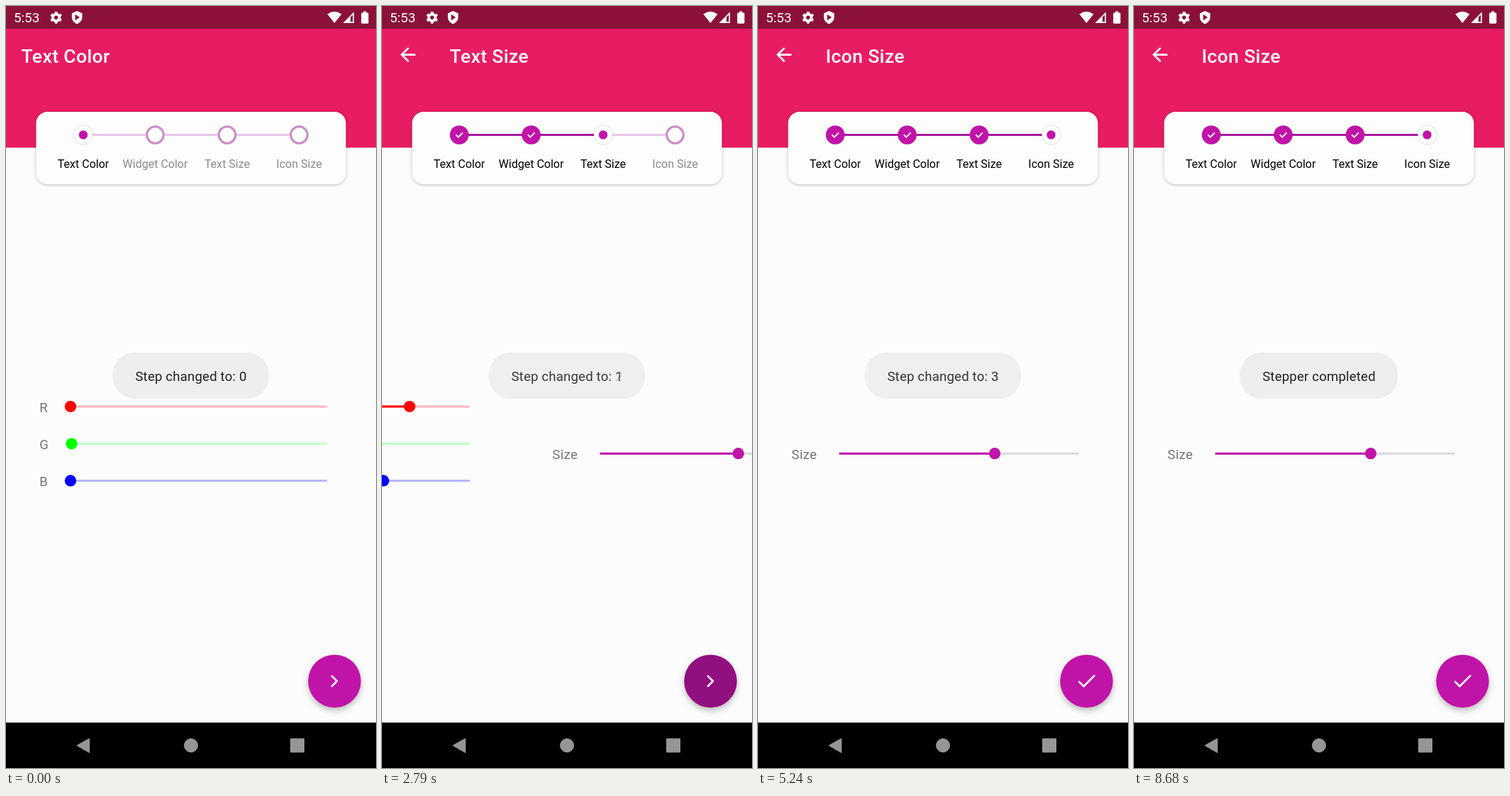
Write an HTML page that moves like this. It is 522 px wide and 1073 px high and loops after 8760 ms.

```html
<!DOCTYPE html>
<html lang="en">
<head>
<meta charset="utf-8">
<title>Stepper</title>
<style>
  html, body { margin: 0; width: 100%; height: 100%; overflow: hidden; background: #fcfcfc; }
  svg { display: block; width: 522px; height: 1073px; font-family: Roboto, "Noto Sans", sans-serif; }
  .title { font-size: 26.6px; font-weight: 500; letter-spacing: .0125em; fill: #fff; }
  .step { font-size: 16px; text-anchor: middle; }
  .label { font-size: 18.6px; letter-spacing: .0179em; fill: #757575; }
  .toast { font-size: 18.6px; letter-spacing: .01em; text-anchor: middle; fill: #202020; }
  .card { filter: drop-shadow(0 1.5px 2px rgba(0, 0, 0, .25)); }
  .current { filter: drop-shadow(0 .5px 1.3px rgba(0, 0, 0, .25)); }
  .stroke { fill: none; stroke: #fff; stroke-linecap: round; stroke-linejoin: round; }
</style>
</head>
<body>
<svg viewBox="0 0 522 1073">
  <defs><clipPath id="fabClip"><circle cx="463.5" cy="950.7" r="37.3"/></clipPath></defs>
  <rect width="522" height="1073" fill="#fcfcfc"/>
  <g id="pages"></g>

  <rect width="522" height="199.5" fill="#e81c62"/>
  <rect width="522" height="32" fill="#8b1139"/>
  <g id="status" fill="#fff">
    <text x="11" y="23" font-size="18.8">5:53</text>
    <g id="gear" transform="translate(70.7 16.3)">
      <circle r="4.6" fill="none" stroke="#fff" stroke-width="3.8"/>
    </g>
    <path d="M100.2 7l7.3 3.2v5.2c0 4.5-3 8.5-7.3 9.8c-4.3-1.3-7.3-5.3-7.3-9.8v-5.2z"/>
    <path d="M97.6 11.8v8.4l6.4-4.2z" fill="#8b1139"/>
    <path d="M463.4 24L453.4 11.4Q463.4 4.2 473.4 11.4Z"/>
    <path d="M491 8.2V24H475.4ZM489.3 12.4L486 15.7V22.3H489.3Z" fill-rule="evenodd"/>
    <path d="M504.3 7.6h4v1.9h2q1.1 0 1.1 1.1v13q0 1.1-1.1 1.1h-8q-1.1 0-1.1-1.1v-13q0-1.1 1.1-1.1h2z"/>
  </g>
  <path id="back" transform="translate(20.6 52.6) scale(1.33)" fill="#fff"
    d="M20 11H7.83l5.59-5.59L12 4l-8 8 8 8 1.41-1.41L7.83 13H20z"/>
  <text id="title" class="title" y="80"></text>

  <rect class="card" x="42.5" y="149" width="437" height="102" rx="16" fill="#fdfdfb"/>
  <g id="stepper"></g>

  <circle id="fab" cx="463.5" cy="950.7" r="37.3" fill="#c014a8"/>
  <circle id="ripple" cx="463.5" cy="950.7" clip-path="url(#fabClip)"/>
  <g transform="translate(447.5 934.7) scale(1.33)">
    <path id="icon" class="stroke" stroke-width="2"/>
  </g>

  <rect y="1009" width="522" height="64"/>
  <g fill="#969696" stroke="#969696" stroke-linejoin="round">
    <path d="M100 1041.3L117.7 1031.5V1051.5Z"/>
    <circle cx="261" cy="1041.2" r="9.5"/>
    <rect x="401.5" y="1031.8" width="19" height="19"/>
  </g>
  <g id="toasts"></g>
</svg>
<script>
const LOOP = 8760, WIDTH = 522, PURPLE = '#c014a8';
const STEPS = ['Text Color', 'Widget Color', 'Text Size', 'Icon Size'];
const CHEVRON = 'M9.3 6.7L14.6 12L9.3 17.3', CHECK = 'M4.2 12.7L9 17.5L20.2 6.3';

// press, release, start of the page slide (ms)
const TAPS = [[460, 570, 603], [2580, 2680, 2712.6], [4650, 4820, 4855], [6840, 6970]];

// text, half width, start of fade in, start of fade out
const TOASTS = [
  ['Step changed to: 0', 110.3, -600, 520],
  ['Step changed to: 1', 110.3, 640, 2600],
  ['Step changed to: 2', 110.3, 2740, 4680],
  ['Step changed to: 3', 110.3, 4890, 6700],
  ['Stepper completed', 111.7, 7000, 9000]
];

const $ = id => document.getElementById(id);
const ramp = (t, start, length) => Math.min(1, Math.max(0, (t - start) / length));
const easeOut = p => 1 - (1 - p) ** 2;

function add(parent, tag, attrs, text) {
  const el = document.createElementNS('http://www.w3.org/2000/svg', tag);
  for (const key in attrs) el.setAttribute(key, attrs[key]);
  if (text) el.textContent = text;
  return parent.appendChild(el);
}

function addBar(parent, x1, x2, y, color) {
  return add(parent, 'line', { x1, x2, y1: y, y2: y, stroke: color, 'stroke-width': 3 });
}

function addSlider(page, label, y, start, value, color, track) {
  add(page, 'text', { class: 'label', x: 47.3, y: y + 8 }, label);
  addBar(page, start, 453, y, track);
  addBar(page, start, value, y, color);
  add(page, 'circle', { cx: value, cy: y, r: 8.1, fill: color });
}

function addPage(index, sliders) {
  const page = add($('pages'), 'g', { transform: `translate(${index * WIDTH} 0)` });
  for (const slider of sliders) addSlider(page, ...slider);
}

const rgb = (r, g, b) => [
  ['R', 564, 91, r, '#f00', '#ffb5be'],
  ['G', 616.3, 92.5, g, '#0f0', '#b8ffc4'],
  ['B', 668.4, 91, b, '#00f', '#bab6ff']
];
const size = value => [['Size', 630.2, 114.5, value, PURPLE, '#d9d9db']];

[rgb(91, 92.5, 91), rgb(368, 125, 331), size(309.8), size(334)]
  .forEach((sliders, i) => addPage(i, sliders));

for (const angle of [0, 60, 120]) {
  add($('gear'), 'rect', { x: -1.9, y: -8.4, width: 3.8, height: 3.4, rx: .6, transform: `rotate(${angle})` });
  add($('gear'), 'rect', { x: -1.9, y: 5, width: 3.8, height: 3.4, rx: .6, transform: `rotate(${angle})` });
}

const nodeX = i => 109 + i * 101.5;
const bars = [0, 1, 2].map(i => addBar($('stepper'), nodeX(i), nodeX(i + 1), 181.5));
const nodes = STEPS.map((name, i) => {
  const g = add($('stepper'), 'g', { transform: `translate(${nodeX(i)} 181.5)` });
  const idle = add(g, 'circle', { r: 11.8, fill: '#fdfdf9', stroke: '#c98bc8', 'stroke-width': 3 });
  const current = add(g, 'g');
  add(current, 'circle', { class: 'current', r: 13, fill: '#fff' });
  add(current, 'circle', { r: 6.2, fill: PURPLE });
  const done = add(g, 'g');
  add(done, 'circle', { r: 13.3, fill: PURPLE });
  add(done, 'path', { class: 'stroke', d: 'M-4.3 .3L-1.4 3.1L4.4-2.7', 'stroke-width': 1.9 });
  const label = add($('stepper'), 'text', { class: 'step', x: nodeX(i), y: 228 }, name);
  return { idle, current, done, label };
});

const toasts = TOASTS.map(([text, half]) => {
  const g = add($('toasts'), 'g');
  add(g, 'rect', { x: 260.8 - half, y: 488, width: half * 2, height: 65, rx: 31, fill: '#eeeeec' });
  add(g, 'text', { class: 'toast', x: 261, y: 527.7 }, text);
  return g;
});

function show(el, on) { el.style.display = on ? '' : 'none'; }

let shown = -1;
function setStep(step) {
  if (step === shown) return;
  shown = step;
  $('title').textContent = STEPS[step];
  $('title').setAttribute('x', step ? 95.5 : 21.5);
  show($('back'), step > 0);
  $('icon').setAttribute('d', step < 3 ? CHEVRON : CHECK);
  bars.forEach((bar, i) => bar.setAttribute('stroke', i < step ? '#a81a9c' : '#e9c6e7'));
  nodes.forEach(({ idle, current, done, label }, i) => {
    show(idle, i > step);
    show(current, i === step);
    show(done, i < step);
    label.setAttribute('fill', i > step ? '#8a8a8a' : '#000');
  });
}

function drawFab(t) {
  let lift = 0, radius = 0, shade = 0;
  for (const [press, release] of TAPS) {
    if (t < press || t > release + 260) continue;
    lift = ramp(t, press, 100) * (1 - ramp(t, release, 100));
    radius = 37.5 * easeOut(ramp(t, press, 170));
    shade = .24 * ramp(t, press, 100) * (1 - ramp(t, release + 130, 130));
  }
  $('fab').style.filter =
    `drop-shadow(0 ${4 + 5 * lift}px ${4 + 5 * lift}px rgba(0,0,0,${.26 + .02 * lift}))`;
  $('ripple').setAttribute('r', radius);
  $('ripple').setAttribute('fill-opacity', shade);
}

function draw(t) {
  setStep(TAPS.slice(0, 3).filter(tap => t >= tap[1]).length);
  let scroll = 0;
  for (const [, , slide] of TAPS.slice(0, 3)) scroll += easeOut(ramp(t, slide, 200));
  $('pages').setAttribute('transform', `translate(${-WIDTH * scroll} 0)`);
  drawFab(t);
  TOASTS.forEach(([, , enter, leave], i) => {
    toasts[i].setAttribute('opacity', easeOut(ramp(t, enter, 500)) * (1 - ramp(t, leave, 500) ** 2));
  });
}

const begin = performance.now();
function tick() {
  draw((performance.now() - begin) % LOOP);
  requestAnimationFrame(tick);
}
tick();
</script>
</body>
</html>
```
